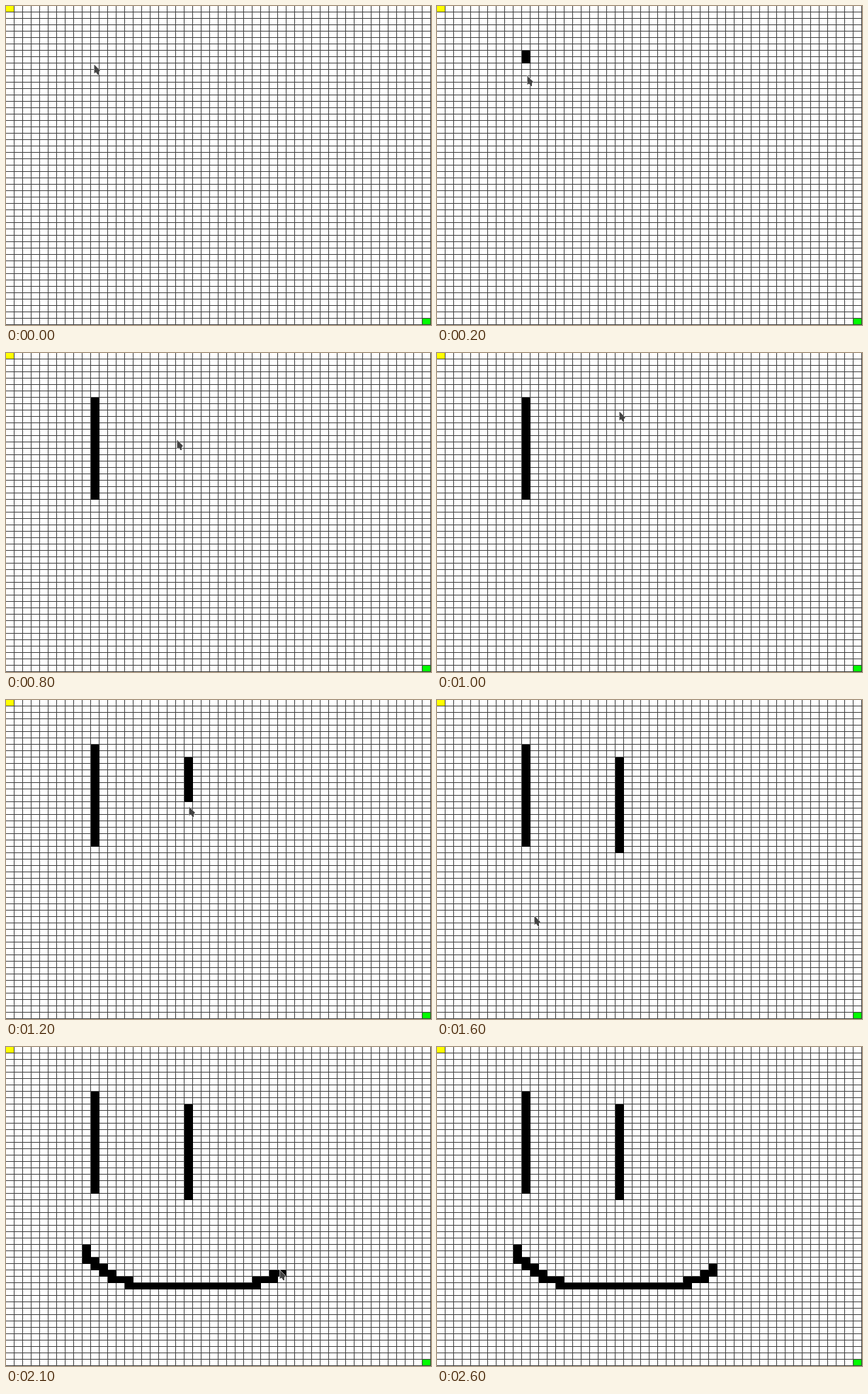
Recreate the animation shown at these times as an HTML page with a canvas. Size 600 by 450 pixels, loop 3900 ms.

```html
<!DOCTYPE html>
<html lang="en">
<head>
<meta charset="utf-8">
<title>Drawing walls on a grid</title>
<style>
  html, body { margin: 0; height: 100%; overflow: hidden; background: #fff; }
  canvas { display: block; }
</style>
</head>
<body>
<canvas id="stage" width="600" height="450"></canvas>
<script>
const ctx = document.getElementById('stage').getContext('2d');
const LOOP = 3900, STEP = 100, EXIT = 2600;
const CELLS = 50, CELL_W = 12, CELL_H = 9;

// Each stroke speeds up between its start and end; corners are in cells.
const strokes = [
  { start: 0, end: 500, cells: trace([10, 7], [10, 22]) },
  { start: 930, end: 1300, cells: trace([21, 9], [21, 23]) },
  { start: 1700, end: 2103, cells: trace(
    [9, 31], [9, 33], [10, 33], [10, 34], [11, 34], [11, 35], [12, 35], [12, 36],
    [14, 36], [14, 37], [29, 37], [29, 36], [31, 36], [31, 35], [32, 35], [32, 34]) }
];

// Pointer stops: time, x, y and an optional pause before moving on.
const stops = [
  [0, 124, 82], [100, 127, 64], [400, 128, 165], [500, 125, 204, 100],
  [800, 241, 122], [1000, 257, 82], [1200, 258, 150], [1300, 262, 213, 100],
  [1600, 137, 304], [1700, 112, 282], [1900, 165, 329], [2000, 259, 340],
  [2100, 386, 314], [2300, 390, 308, 100], [2500, 94, 385]
];

const arrow = new Path2D('M.5 .5V13L3 11.5 5.5 15H7V11L9 9Z');

function trace(first, ...corners) {
  let [x, y] = first;
  const cells = [first];
  for (const [endX, endY] of corners) {
    while (x !== endX || y !== endY) {
      x += Math.sign(endX - x);
      y += Math.sign(endY - y);
      cells.push([x, y]);
    }
  }
  return cells;
}

function progress(t, start, end) {
  return Math.min(1, Math.max(0, (t - start) / (end - start)));
}

function pointerAt(t) {
  const i = stops.findLastIndex(stop => stop[0] <= t);
  const [time, x, y, pause = 0] = stops[i];
  const [nextTime, nextX, nextY] = stops[i + 1] || [EXIT, x, y];
  const p = progress(t, time + pause, nextTime);
  return [Math.round(x + (nextX - x) * p), Math.round(y + (nextY - y) * p)];
}

function fillCell(col, row, color) {
  ctx.fillStyle = color;
  ctx.fillRect(col * CELL_W, row * CELL_H, CELL_W, CELL_H);
}

function drawGrid() {
  ctx.fillStyle = '#404040';
  for (let i = 1; i <= CELLS; i++) {
    ctx.fillRect(i * CELL_W - 1, 0, 1, 450);
    ctx.fillRect(0, i * CELL_H - 1, 600, 1);
  }
}

function drawPointer(x, y) {
  ctx.save();
  ctx.translate(x, y);
  ctx.strokeStyle = '#fff';
  ctx.stroke(arrow);
  ctx.fillStyle = '#444';
  ctx.fill(arrow);
  ctx.restore();
}

function render(now) {
  const t = Math.floor(now % LOOP / STEP) * STEP;
  ctx.fillStyle = '#fff';
  ctx.fillRect(0, 0, 600, 450);
  fillCell(0, 0, '#ff0');
  fillCell(CELLS - 1, CELLS - 1, '#0f0');
  drawGrid();
  for (const { start, end, cells } of strokes) {
    const count = Math.floor(cells.length * progress(t, start, end) ** 2);
    for (const [col, row] of cells.slice(0, count)) fillCell(col, row, '#000');
  }
  if (t < EXIT) drawPointer(...pointerAt(t));
}

function tick() {
  render(performance.now());
  requestAnimationFrame(tick);
}
tick();
</script>
</body>
</html>
```
